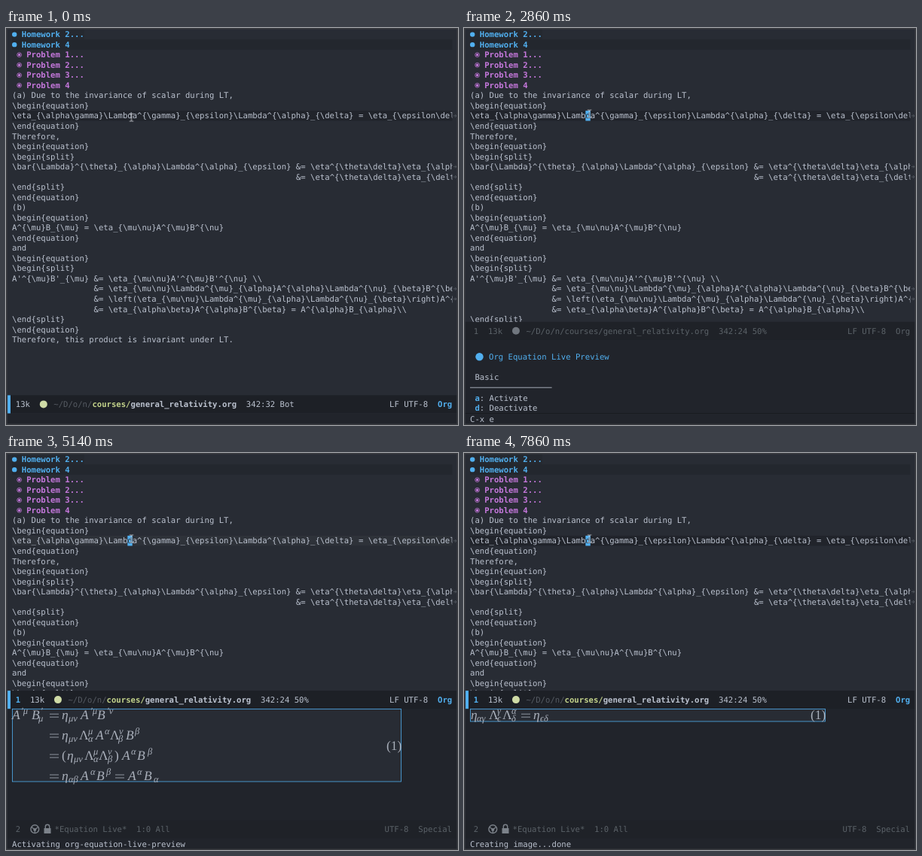
Recreate the animation shown at these times as an HTML page. Size 600 by 528 pixels, loop 8000 ms.

```html
<!DOCTYPE html>
<html lang="en">
<head>
<meta charset="utf-8">
<title>Equation live preview</title>
<style>
html, body { margin: 0; width: 100%; height: 100%; overflow: hidden; background: #282c34; }
svg { display: block; width: 600px; height: 528px; }
text {
  font: 10.612px "DejaVu Sans Mono", monospace;
  fill: #bbc2cf; white-space: pre; text-rendering: geometricPrecision;
}
.b { font-weight: bold; }
.blue { fill: #51afef; }
.violet { fill: #c678dd; }
.dim { fill: #5b6268; }
.path { fill: #565b63; }
.dir { fill: #c3d38b; }
.dark { fill: #282c34; }
.math { font: italic 17.5px "Liberation Serif", serif; fill: #a9afba; }
.up { font-style: normal; }
.small { font-size: 12.5px; }

.anim { opacity: 0; animation: 8s step-end infinite; }
#blink { animation-name: blink; }
#pos1 { animation-name: pos1; }
#pos2 { animation-name: pos2; }
#full { animation-name: full; }
#menu { animation-name: menu; }
#split { animation-name: split; }
#eqs { animation-name: eqs; }
#eq { animation-name: eq; }
#pulse { animation-name: pulse; }
#mouse { animation: mouse 8s step-end infinite; }

/* one tick is 1/56 of the loop */
@keyframes blink {
  0%, 10.71%, 25%, 41.07%, 53.57%, 66.07%, 78.57%, 91.07% { opacity: 0; }
  5.35%, 17.85%, 30.35%, 46.42%, 60.71%, 73.21%, 85.71%, 98.21%, 100% { opacity: 1; }
}
@keyframes pos1 { 0% { opacity: 1; } 3.57%, 100% { opacity: 0; } }
@keyframes pos2 { 0% { opacity: 0; } 3.57%, 100% { opacity: 1; } }
@keyframes full { 0% { opacity: 1; } 33.92%, 100% { opacity: 0; } }
@keyframes menu { 0%, 60.71%, 100% { opacity: 0; } 33.92% { opacity: 1; } }
@keyframes split { 0% { opacity: 0; } 60.71%, 100% { opacity: 1; } }
@keyframes eqs { 0%, 64.28%, 100% { opacity: 0; } 60.71% { opacity: 1; } }
@keyframes eq { 0% { opacity: 0; } 64.28%, 100% { opacity: 1; } }
@keyframes pulse { 0%, 64.28%, 100% { opacity: 0; } 60.71% { opacity: 1; } 62.5% { opacity: .5; } }
@keyframes mouse {
  0% { transform: translate(166.5px, 119px); }
  1.78% { transform: translate(166.5px, 116px); }
  3.57%, 100% { transform: translate(166.5px, 114px); }
}
</style>
</head>
<body>
<svg id="stage" viewBox="0 0 600 528"></svg>
<script>
const CW = 6.389, RH = 13.53, X0 = 8, RIGHT = 592.4;
const lines = String.raw`  Homework 2...
  Homework 4
   Problem 1...
   Problem 2...
   Problem 3...
   Problem 4
(a) Due to the invariance of scalar during LT,
\begin{equation}
\eta_{\alpha\gamma}\Lambda^{\gamma}_{\epsilon}\Lambda^{\alpha}_{\delta} = \eta_{\epsilon\delta}
\end{equation}
Therefore,
\begin{equation}
\begin{split}
\bar{\Lambda}^{\theta}_{\alpha}\Lambda^{\alpha}_{\epsilon} &= \eta^{\theta\delta}\eta_{\alpha
>59&= \eta^{\theta\delta}\eta_{\delta
\end{split}
\end{equation}
(b)
\begin{equation}
A^{\mu}B_{\mu} = \eta_{\mu\nu}A^{\mu}B^{\nu}
\end{equation}
and
\begin{equation}
\begin{split}
A'^{\mu}B'_{\mu} &= \eta_{\mu\nu}A'^{\mu}B'^{\nu} \\
>17&= \eta_{\mu\nu}\Lambda^{\mu}_{\alpha}A^{\alpha}\Lambda^{\nu}_{\beta}B^{\beta}
>17&= \left(\eta_{\mu\nu}\Lambda^{\mu}_{\alpha}\Lambda^{\nu}_{\beta}\right)A^{\alpha}
>17&= \eta_{\alpha\beta}A^{\alpha}B^{\beta} = A^{\alpha}B_{\alpha}\\
\end{split}
\end{equation}
Therefore, this product is invariant under LT.`.split("\n");

const esc = s => s.replace(/&/g, "&amp;").replace(/</g, "&lt;");
const text = (x, y, s, cls = "") => `<text x="${x}" y="${y}" class="${cls}">${esc(s)}</text>`;
const rect = (x, y, w, h, fill) => `<rect x="${x}" y="${y}" width="${w}" height="${h}" fill="${fill}"/>`;
const disc = (x, y, r, fill) => `<circle cx="${x}" cy="${y}" r="${r}" fill="${fill}"/>`;
const ring = (x, y, r, color, w) =>
  `<circle cx="${x}" cy="${y}" r="${r}" fill="none" stroke="${color}" stroke-width="${w}"/>`;
const stroke = (d, color, w = 1) => `<path d="${d}" fill="none" stroke="${color}" stroke-width="${w}"/>`;
const layer = (id, body) => `<g id="${id}" class="anim">${body}</g>`;
const rowTop = r => 1.7 + r * RH;

function buffer() {
  let marks = "", rows = "";
  lines.forEach((line, r) => {
    const pad = line.match(/^>(\d+)/);
    const s = pad ? line.slice(pad[0].length) : line;
    const col = pad ? +pad[1] : 0, mid = rowTop(r) + 6.9;
    if (X0 + (col + s.length) * CW > RIGHT) marks += stroke(`M594 ${mid}h4m-2-2l2 2-2 2`, "#50555d");
    if (r < 2) marks += disc(11.2, mid, 3.2, "#51afef");
    else if (r < 6) marks += disc(17.6, mid, 1.7, "#c678dd") + ring(17.6, mid, 2.9, "#c678dd", .8);
    rows += text(X0 + col * CW, rowTop(r) + 10.5, s, r < 2 ? "b blue" : r < 6 ? "b violet" : "");
  });
  const band = (r, w, fill) => rect(X0, rowTop(r), w, RH, fill), w = RIGHT - X0;
  return `<clipPath id="area">${rect(0, 0, RIGHT, 528, "#000")}</clipPath>`
    + band(0, 15 * CW, "#252930") + band(1, w, "#23272e") + band(8, w, "#21242b")
    + layer("pulse", band(8, w, "#3c4047")) + marks + `<g clip-path="url(#area)">${rows}</g>`;
}

// mode line of the text buffer; mid is its centre, win shows the window number
function modeline(mid, active, win, pos) {
  const y = mid + 3.8, dx = win ? 3 * CW : 0, px = 63.3 + dx, c = active ? "" : "dim";
  let out = rect(1.5, mid - 12, 597, 24.1, active ? "#1d2026" : "#1f2228");
  if (active) out += rect(2, mid - 12, 4, 24.1, "#51afef");
  if (win) out += text(12.8, y, "1", active ? "b blue" : "dim");
  out += text(12.8 + dx, y, "13k", c) + disc(49.8 + dx, mid, 5, active ? "#cfdba6" : "#70767e");
  out += active
    ? text(px, y, "~/D/o/n/", "path") + text(px + 8 * CW, y, "courses/", "b dir")
      + text(px + 16 * CW, y, "general_relativity.org", "b")
    : text(px, y, "~/D/o/n/courses/general_relativity.org", "dim");
  return out + pos(px + 40 * CW, y, c) + text(509, y, "LF UTF-8", c)
    + text(573, y, "Org", active ? "b blue" : c);
}
const at = s => (x, y, c) => text(x, y, s, c);
const echo = s => rect(1.5, 513, 597, 13.5, "#21242b") + text(8, 523.8, s);

// tokens: optional ^ or _, glyphs, then x
function math(y, src) {
  return src.split(" ").map(tok => {
    const [, shift, s, x] = tok.match(/^([\^_]?)(\D+)(\d+)$/);
    if (s === "=") return stroke(`M${x} ${y - 6.5}h12m-12 4h12`, "#a9afba", .8);
    const dy = shift === "^" ? -6.5 : shift === "_" ? 3.5 : 0;
    return text(x, y + dy, s, "math" + (/[Λ()]/.test(s) ? " up" : "") + (shift ? " small" : ""));
  }).join("");
}
const frame = (w, h) =>
  `<rect x="8.5" y="340.5" width="${w}" height="${h}" fill="#282c34" stroke="#51afef" stroke-width=".8"/>`;

const fullView = modeline(500.4, true, false, (x, y) =>
  layer("pos1", text(x, y, "342:32 Bot")) + layer("pos2", text(x, y, "342:24 Bot")))
  + echo("");

const menuView = rect(1.5, 414, 597, 113, "#21242b")
  + modeline(402.8, false, true, at("342:24 50%"))
  + disc(20.5, 437.3, 5.2, "#51afef") + text(33, 441.2, "Org Equation Live Preview", "blue")
  + text(X0 + CW, 468.3, "Basic") + rect(8, 477.7, 17 * CW, 1, "#a4aab5")
  + text(X0 + CW, 495.6, "a", "b blue") + text(X0 + 2 * CW, 495.6, ": Activate")
  + text(X0 + CW, 509.2, "d", "b blue") + text(X0 + 2 * CW, 509.2, ": Deactivate")
  + echo("C-x e") + rect(1.5, 512, 597, 1, "#191b20");

const bigEq = frame(516, 96.5)
  + math(353.7, "A8 ^′μ20 B34 ^′46 _μ43 =58 η74 _μν83 A99 ^′μ112 B121 ^′ν134")
  + math(380.5, "=58 η74 _μν83 Λ97 ^μ109 _α109 A119 ^α131 Λ138 ^ν150 _β149 B159 ^β171")
  + math(407.5, "=58 (74 η81 _μν90 Λ104 ^μ116 _α116 Λ123 ^ν135 _β135 )144 A154 ^α166 B174 ^β188")
  + math(434.5, "=58 η74 _αβ83 A99 ^α112 B120 ^β133 =145 A162 ^α174 B183 _α196")
  + text(505, 394.5, "(1)", "math up") + echo("Activating org-equation-live-preview");

const smallEq = frame(471, 16.5)
  + math(353.7, "η9 _αγ17 Λ33 ^γ44 _ϵ44 Λ51 ^α63 _δ63 =76 η92 _ϵδ101")
  + text(460, 353.7, "(1)", "math up") + echo("Creating image...done");

const splitView = rect(1.5, 339, 597, 188, "#21242b")
  + modeline(328.1, true, true, at("342:24 50%"))
  + rect(1.5, 488.4, 597, 24.1, "#1f2228")
  + text(12.8, 504.2, "2", "dim")
  + ring(38.3, 500.2, 5.4, "#7c828a", 1.4) + disc(38.3, 501, 2, "#7c828a")
  + stroke("M34 497.5l4.3 3.5 4.3-3.5M38.3 501v4.5", "#7c828a", 1.2)
  + rect(50.5, 499, 9, 7, "#7c828a") + stroke("M52.3 499v-2a2.7 2.7 0 0 1 5.4 0v2", "#7c828a", 1.4)
  + text(64.5, 504.2, "*Equation Live*", "dim") + text(173, 504.2, "1:0 All", "dim")
  + text(502.5, 504.2, "UTF-8", "dim") + text(547.3, 504.2, "Special", "dim")
  + layer("eqs", bigEq) + layer("eq", smallEq);

const cx = X0 + 24 * CW;
document.getElementById("stage").innerHTML = rect(0, 0, 600, 528, "#282c34")
  + buffer()
  + layer("blink", rect(cx, rowTop(8), CW, RH, "#51afef") + text(cx, rowTop(8) + 10.5, "d", "dark"))
  + `<g id="mouse">${stroke("M-2.5-5h2l.5.5.5-.5h2M0-4.5v9M-2.5 5h2l.5-.5.5.5h2", "#d8dbe0", .9)}</g>`
  + layer("full", fullView) + layer("menu", menuView) + layer("split", splitView)
  + `<rect x=".75" y=".75" width="598.5" height="526.5" fill="none" stroke="#393b40" stroke-width="1.5"/>`;
</script>
</body>
</html>
```
